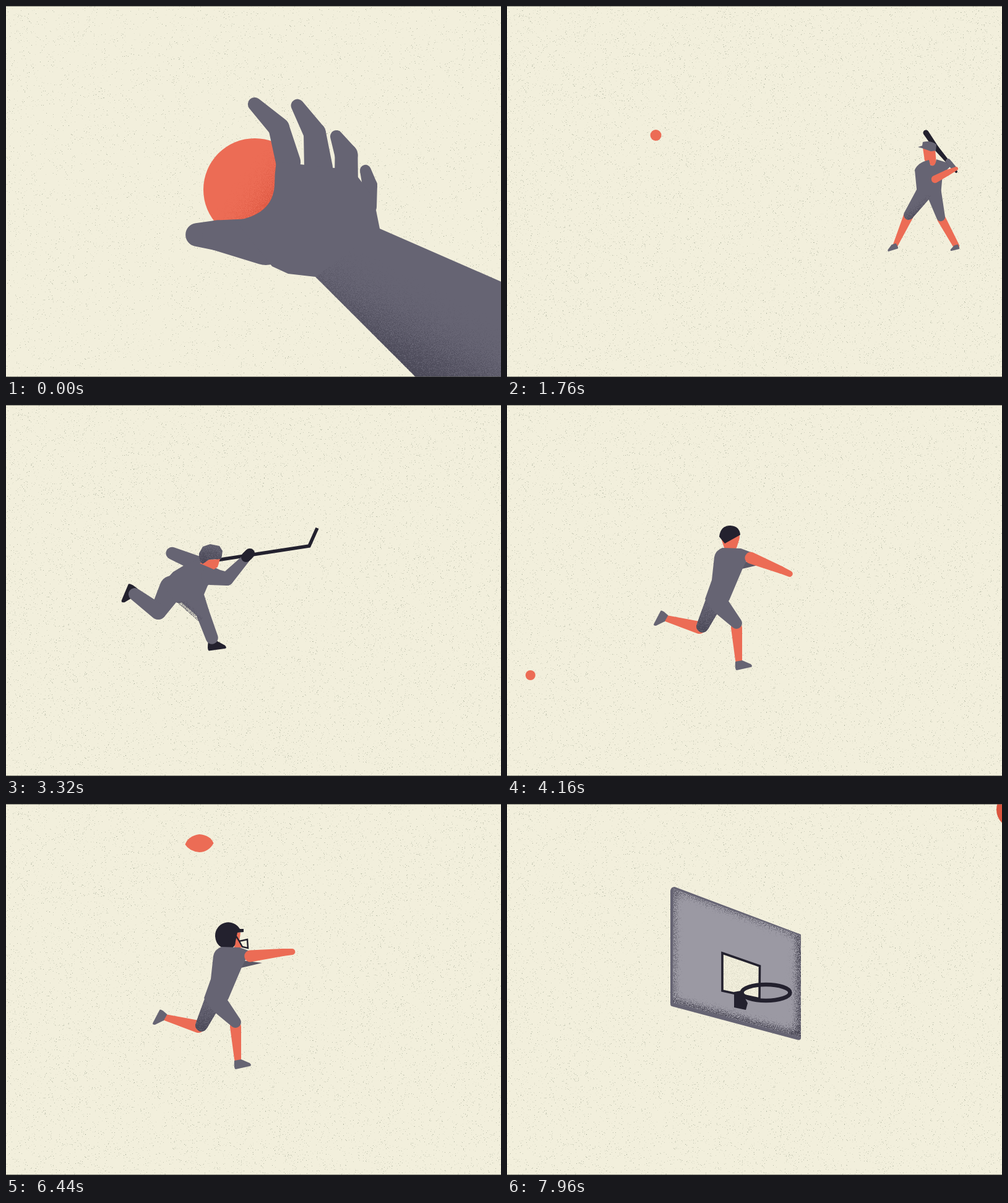
These frames come from a looping animation (800x600 px, 8000 ms). An HTML page with a canvas:

```html
<!DOCTYPE html>
<html lang="en">
<head>
<meta charset="utf-8">
<title>Play ball</title>
<style>
html, body { margin: 0; width: 100%; height: 100%; overflow: hidden; background: #f2efdc; }
canvas, svg { position: absolute; left: 0; top: 0; width: 800px; height: 600px; }
</style>
</head>
<body>
<canvas id="paper" width="800" height="600"></canvas>
<canvas id="dust" width="800" height="600"></canvas>
<svg id="stage" viewBox="0 0 800 600"></svg>
<script>
const SLATE = '#666473', DARK = '#4b4958', CORAL = '#ec6c55', RUST = '#db553f', INK = '#23212e', CREAM = '#f2efdc';
const LOOP = 8000, STEP = 40;
const $ = id => document.getElementById(id);

// Speckled paper
function speckle(id, count, seed) {
  const ctx = $(id).getContext('2d');
  const rnd = () => (seed = (seed * 16807) % 2147483647) / 2147483647;
  for (let i = 0; i < count; i++) {
    ctx.fillStyle = `rgba(112,124,104,${0.12 + 0.4 * rnd() ** 2})`;
    ctx.fillRect(Math.floor(rnd() * 800), Math.floor(rnd() * 600), 1, 1);
  }
}
speckle('paper', 10500, 71);
speckle('dust', 6500, 409);

// Markup helpers
const part = (id, body) => `<g id="${id}">${body}</g>`;
const fill = (d, color = SLATE) => `<path d="${d}" fill="${color}"/>`;
const line = (d, width) => `<path d="${d}" fill="none" stroke="${INK}" stroke-width="${width}"/>`;
const disc = (id, r, color = CORAL) => `<circle id="${id}" r="${r}" fill="${color}"/>`;
const grain = (d, grad, kind = 'dark') => `<path d="${d}" fill="url(#${grad})" filter="url(#${kind})"/>`;

// Outline around two circles
function taper(x1, y1, r1, x2, y2, r2) {
  const a = Math.atan2(y2 - y1, x2 - x1);
  const b = Math.acos((r1 - r2) / Math.hypot(x2 - x1, y2 - y1));
  const on = (x, y, r, w) => `${(x + r * Math.cos(w)).toFixed(1)} ${(y + r * Math.sin(w)).toFixed(1)}`;
  const arc = (r, big) => `A${r} ${r} 0 ${+big} 1 `;
  return `M${on(x1, y1, r1, a + b)}${arc(r1, r1 > r2)}${on(x1, y1, r1, a - b)}` +
    `L${on(x2, y2, r2, a - b)}${arc(r2, r2 > r1)}${on(x2, y2, r2, a + b)}Z`;
}
// Chain of [x, y, radius] joints
const limb = (color, ...joints) =>
  joints.slice(1).map((j, i) => fill(taper(...joints[i], ...j), color)).join('');
const shoe = (x, y, deg, size, color = SLATE) =>
  `<path d="M-6-6L5-8 19-2Q23 2 19 3L-4 8Q-7 7-6-6Z" fill="${color}"
    transform="translate(${x} ${y}) rotate(${deg}) scale(${size} ${Math.abs(size)})"/>`;

const fade = (id, x1, y1, x2, y2) => `<linearGradient id="${id}" gradientUnits="userSpaceOnUse"
  x1="${x1}" y1="${y1}" x2="${x2}" y2="${y2}"><stop stop-opacity="1"/><stop offset="1" stop-opacity="0"/></linearGradient>`;
const stipple = (id, color) => `<filter id="${id}" x="0" y="0" width="1" height="1" color-interpolation-filters="sRGB">
  <feTurbulence type="fractalNoise" baseFrequency=".9" numOctaves="2" seed="4"/>
  <feColorMatrix values="0 0 0 0 0  0 0 0 0 0  0 0 0 0 0  0 0 0 2.4 -.7" result="n"/>
  <feComposite in="SourceAlpha" in2="n" operator="arithmetic" k2=".5" k3=".5"/>
  <feComponentTransfer result="dots"><feFuncA type="linear" slope="16" intercept="-8"/></feComponentTransfer>
  <feFlood flood-color="${color}"/><feComposite in2="dots" operator="in"/>
  <feComposite in2="SourceAlpha" operator="in"/></filter>`;
const blur = (id, size) => `<filter id="${id}" filterUnits="userSpaceOnUse" x="200" y="80" width="340" height="360">
  <feGaussianBlur stdDeviation="${size}"/></filter>`;

const BALL = 'M319 297A83 83 0 0 1 485 297 83 83 0 0 1 319 297Z';
const hand = () => fill(BALL, CORAL) + grain(BALL, 'gBall', 'rust') +
  limb(SLATE, [402, 159, 11], [441, 197, 17], [456, 252, 20]) +
  limb(SLATE, [471, 161, 10.5], [499, 206, 18], [505, 262, 23]) +
  limb(SLATE, [534, 211, 10], [550, 241, 18.5], [550, 290, 19]) +
  limb(SLATE, [581, 266, 9], [588, 290, 12], [586, 325, 13]) +
  limb(SLATE, [309, 370, 19], [342, 371, 24.5], [420, 381, 38]) +
  fill(`M437 252Q434 270 434 290 431 338 370 347L430 421 456 433 500 438 900 838 1000 533 604 360 594 310 560 265Z`) +
  grain('M500 438L604 360 1000 533 900 838Z', 'gArm');

const batter = () => {
  const thigh = [[674, 302, 13], [649, 338, 8]];
  return limb(CORAL, [649, 339, 8], [628, 386, 4]) + limb(CORAL, [702, 344, 7], [726, 388, 5]) +
    shoe(627, 389, -30, -0.65) + shoe(727, 390, -25, -0.55) +
    fill('M672 229L692 232 694 255Q690 262 683 256L675 250Z', CORAL) +
    limb(SLATE, ...thigh) + limb(SLATE, [690, 302, 12], [701, 341, 7]) +
    grain(taper(...thigh.flat()), 'gBat') +
    fill('M659 265Q664 253 682 249L684 257Q692 262 694 248L720 256 704 272 701 306 663 306Z') +
    part('bat', limb(INK, [677, 205, 4.5], [694, 230, 4], [726, 268, 2]) +
      limb(SLATE, [713, 251, 4], [723, 263, 4]) +
      limb(CORAL, [692, 280, 6], [711, 270, 5], [726, 263, 3])) +
    fill('M664 228L671 226 672 220Q685 217 694 224L693 234 685 235 671 230Z');
};

const HOOD = 'M312 240L318 229 330 225 345 228 350 236 348 249 328 250 318 257Q311 252 312 240Z';
const skater = () =>
  part('stick', line('M340 251L490 228 503 199', 5.5)) +
  shoe(203, 299, 125, 1.2, INK) + shoe(333, 389, 5, 1.1, INK) +
  limb(SLATE, [312, 258, 13], [269, 240, 10]) +
  limb(SLATE, [268, 296, 20], [246, 334, 13], [208, 306, 10]) +
  limb(SLATE, [295, 300, 22], [317, 334, 11], [333, 377, 10]) +
  fill('M252 290L270 270 290 258 312 250 352 270 326 292 316 316 276 320Z') +
  limb(SLATE, [330, 277, 14], [357, 281, 11], [387, 249, 7]) +
  grain('M276 319L292 316 319 345 311 350Z', 'gHock') +
  limb(INK, [388, 246, 8], [394, 240, 8]) +
  fill('M313 256L328 250 346 249 342 262 336 266Z', CORAL) + fill(HOOD) + grain(HOOD, 'gHood');

const golfer = () => {
  const thigh = [[378, 306, 11], [363.5, 357, 8.5]];
  return limb(CORAL, [361, 364, 9], [355.5, 420, 4.5]) + limb(CORAL, [403, 364, 10], [412, 420, 4.5]) +
    shoe(355, 425, 0, -0.45) + shoe(413, 426, 0, 0.65) +
    limb(SLATE, ...thigh) + limb(SLATE, [396, 308, 14], [401, 358, 9.5]) + grain(taper(...thigh.flat()), 'gGolf') +
    fill('M357 242Q362 233 372 231L396 231 402 237 410 308 384 320 366 308 364 290Z') +
    fill('M369 219L392 219Q391 235 381 235 370 234 369 219Z', CORAL) +
    fill('M367 203L383 197 396 200 397 219 366 221Z') + fill('M367 203L383 197 396 200 396 211 367 213Z', DARK) +
    part('arms', limb(SLATE, [364, 248, 11], [336, 268, 4]) +
      part('club', line('M298 234L294.5 132', 3) + limb(INK, [296, 126, 5], [296, 130, 5])) +
      limb(CORAL, [363, 261, 7], [334, 258, 9], [297, 235, 5.5]));
};

// Running player; the id prefix keeps the limbs of each copy apart
const HELMET = fill('M370 207L379 208 377 222 381 232 369 233Z', CORAL) +
  fill('M338 214A21.5 21.5 0 0 1 378 202L384 202 384 207 374 208 371 222Q371 232 362 234 340 235 338 214Z', INK) +
  line('M372 214L377 222 390 219 391 233 382 231 377 222', 2.4);
const BARE = limb(CORAL, [361, 213, 15], [361, 226, 11]) + fill('M343 213Q345 195 361 195 376 196 377 210L352 224Z', INK);
const runner = (id, head) => {
  const thigh = [[334, 320, 14], [316, 358, 10]];
  return part(id + 'Back', part(id + 'Shin', limb(CORAL, [311, 360, 10], [257, 345, 5]) + shoe(252, 341, 130, 1)) +
      limb(SLATE, ...thigh) + grain(taper(...thigh.flat()), 'gRun')) +
    fill('M382 253L414 257 380 265Z', '#5a5866') +
    part(id + 'Front', limb(CORAL, [371, 360, 9], [374.5, 412, 5.5]) + shoe(375, 421, 0, 1) +
      limb(SLATE, [344, 323, 15], [371, 353, 9])) +
    head + fill('M335 246Q337 235 348 231L378 232 394 238 381 264 359 316 338 336 320 314 331 283Z') +
    part(id + 'Arm', limb(CORAL, [395, 246, 9.5], [447, 240, 6], [462, 239, 5]));
};
function stride(id, swing, arm = 0) {
  turn(id + 'Back', -24 * swing, 328, 318);
  turn(id + 'Shin', -22 * swing, 312, 358);
  turn(id + 'Front', 28 * swing, 340, 322);
  turn(id + 'Arm', arm, 392, 245);
}

const FACE = 'M269 137L475 213 475 377 268 321Z', PANE = 'M348 241L408.5 262 408 315 348 302Z';
const board = () =>
  fill('M264 140Q265 134 271 134L475 211 475 379Q474 383 468 381L266 327Q264 326 264 323Z') + fill(FACE, '#9b99a3') +
  `<g filter="url(#ink)"><g clip-path="url(#face)">
    <path d="${FACE}" fill="none" stroke="#000" stroke-opacity=".8" stroke-width="13" filter="url(#soft)"/>
    <path d="M475 210V380L268 324" fill="none" stroke="#000" stroke-opacity=".7" stroke-width="16" filter="url(#wide)"/></g></g>` +
  fill(PANE, CREAM) + `<path d="${PANE}" fill-opacity=".4" filter="url(#sand)"/>` + line(PANE, 3.6) +
  fill('M367 304L378 302 389 322 386 333 367 329Z', INK) +
  `<ellipse cx="418.5" cy="305" rx="39" ry="13" fill="none" stroke="${INK}" stroke-width="6.5"/>`;

// Motion helpers
const linear = u => u, smooth = u => u * u * (3 - 2 * u), out = u => 1 - (1 - u) ** 3;
const span = (t, from, to, ease = linear) => ease(Math.min(1, Math.max(0, (t - from) / (to - from))));
const arch = u => Math.sin(Math.PI * u);
const put = (id, transform) => $(id).setAttribute('transform', transform);
const move = (id, x, y = 0, more = '') => put(id, `translate(${x} ${y}) ${more}`);
const turn = (id, deg, x, y) => put(id, `rotate(${deg} ${x} ${y})`);

// Each scene: start time, markup, pose at time t
const scenes = [
  [0, part('hand', hand()), t => {
    const u = span(t, 0, 480, out);
    move('hand', -35 * u, 14 * u);
  }],
  [760, part('s', runner('s', BARE)) + disc('sBall', 14), t => {
    const drop = span(t, 800, 1320), kick = span(t, 1320, 1560);
    move('s', -500 + 335 * span(t, 800, 1560, out));
    stride('s', Math.sin((t - 840) / 75));
    move('sBall', -30 + 270 * drop + 546 * kick, -30 + 430 * drop ** 2 - 290 * out(kick));
  }],
  [1600, batter() + disc('pitch', 9), t => {
    const come = span(t, 1600, 2120), back = span(t, 2120, 2400);
    move('pitch', 75 + 538 * (come - back), 195 + 45.5 * come - 154 * back);
    turn('bat', -190 * span(t, 1960, 2240, smooth), 692, 264);
  }],
  [2440, disc('fly', 100), t => {
    const u = span(t, 2440, 3240);
    move('fly', 60 + 720 * smooth(u), 70 + 180 * u + 200 * arch(u), `scale(${1.5 - 1.37 * u})`);
  }],
  [3280, part('skater', skater()), t => {
    move('skater', (t - 3320) / 5);
    turn('stick', -14 * span(t, 3320, 3720, out), 392, 243);
  }],
  [4120, part('k', runner('k', BARE)) + disc('kBall', 8), t => {
    const roll = span(t, 4120, 4480), kick = span(t, 4480, 4920);
    stride('k', -arch(span(t, 4320, 4640)), 30 - 50 * span(t, 4120, 4480, smooth));
    move('kBall', -8 + 413 * roll + 305 * kick, 437 - 137 * out(kick));
  }],
  [4960, golfer() + disc('tee', 6.5), t => {
    const low = 1 - span(t, 4960, 5160, smooth), swing = span(t, 5240, 5560, smooth), flight = span(t, 5400, 5760);
    turn('arms', -75 * low - 170 * swing, 364, 258);
    turn('club', -98 * low - 150 * swing, 298, 236);
    move('tee', 311 + 394 * flight, 437 - 355 * out(flight));
  }],
  [5800, part('r', runner('r', HELMET)) +
    part('oval', fill('M-23 2Q-18-12 0-14.5 18-13 23 0 15 14 0 14.5-16 13-23 2Z', CORAL)), t => {
    const u = t - 6440;
    move('r', 0.3 * u);
    stride('r', Math.sin(u / 80));
    move('oval', 312.5 + 2.85 * u, 63.5 + u * u / 900);
  }],
  [6640, part('d', runner('d', BARE)) + disc('dBall', 17), t => {
    const run = span(t, 6640, 7080), shoot = span(t, 7080, 7440);
    move('d', -320 + 314 * run + 40 * shoot);
    stride('d', Math.sin(6 * run) * (1 - shoot), 25 - 70 * span(t, 7040, 7200, smooth));
    move('dBall', 142 + 314 * run + 314 * shoot, 434 - 140 * Math.abs(Math.sin(4 * run)) - 248 * out(shoot));
  }],
  [7480, part('board', board()) + disc('shot', 30, RUST), t => {
    move('board', 545 * (1 - span(t, 7440, 7960, out)));
    move('shot', 821 + (7960 - t), 9 - (7960 - t) * 0.4);
  }]
];

$('stage').innerHTML = '<defs>' +
  stipple('dark', DARK) + stipple('rust', RUST) + stipple('ink', '#3a3846') + stipple('sand', '#c6c5b2') +
  fade('gBall', 445, 325, 375, 275) + fade('gArm', 600, 570, 665, 440) + fade('gBat', 670, 337, 655, 316) +
  fade('gHock', 290, 340, 308, 322) + fade('gHood', 328, 256, 336, 205) + fade('gGolf', 360, 368, 382, 312) +
  fade('gRun', 316, 372, 326, 290) + blur('soft', 7) + blur('wide', 10) +
  `<clipPath id="face"><path d="${FACE}"/></clipPath></defs>` +
  scenes.map(([, body], i) => part('scene' + i, body)).join('') +
  '<path d="M0 .5H800M0 599.5H800" stroke="#55564f" stroke-opacity=".65"/>';

function draw(t) {
  const now = scenes.filter(([from]) => t >= from).length - 1;
  scenes.forEach((_, i) => { $('scene' + i).style.display = i === now ? '' : 'none'; });
  $('dust').style.display = t < 1600 ? 'none' : '';
  scenes[now][2](t);
}
const start = performance.now();
function tick() {
  const t = (performance.now() - start) % LOOP;
  draw(Math.floor(t / STEP) * STEP);
  requestAnimationFrame(tick);
}
tick();
</script>
</body>
</html>
```
